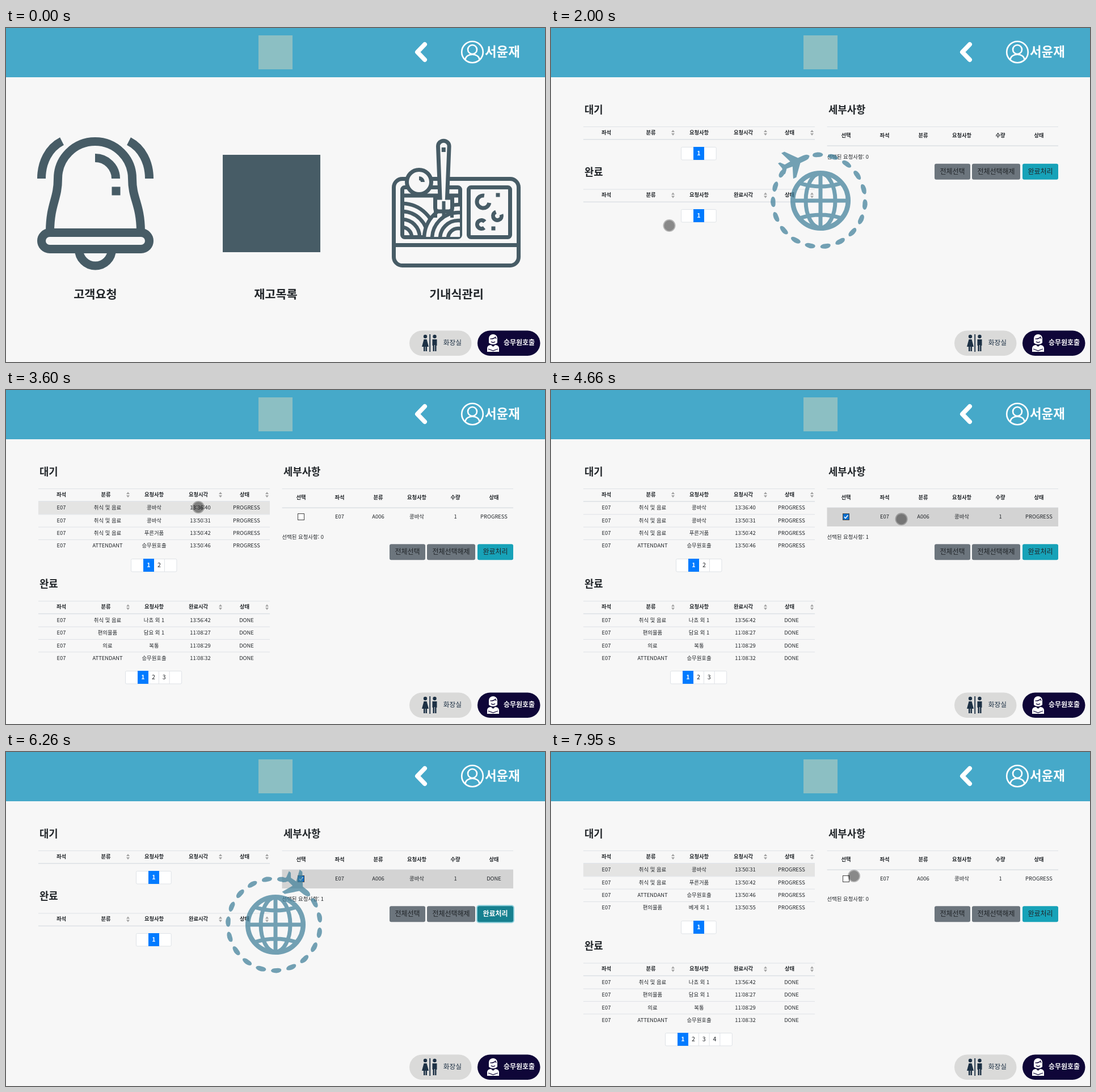
An HTML page that plays this animation: 950x590 px, repeating every 8000 ms.

```html
<!DOCTYPE html>
<html lang="ko">
<head>
<meta charset="utf-8">
<title>기내 서비스</title>
<style>
html, body { margin: 0; width: 100%; height: 100%; overflow: hidden; background: #f7f7f7; }
svg { display: block; width: 950px; height: 590px; font-family: "Noto Sans CJK KR", "Noto Sans KR", "Noto Sans", sans-serif; }
</style>
</head>
<body>
<svg id="stage" viewBox="0 0 950 590" xmlns="http://www.w3.org/2000/svg">
  <rect width="950" height="590" fill="#f7f7f7"/>
  <g id="top"></g>
  <g id="page"></g>
  <g id="pills"></g>
  <g id="loader" opacity=".72" fill="#3f7f9a" stroke="none">
    <g id="globe"></g>
    <g id="ring"></g>
  </g>
  <g id="cursor">
    <circle r="11" fill="#000" fill-opacity=".27"/>
    <circle r="9.2" fill="#000" fill-opacity=".24"/>
  </g>
</svg>
<script>
const LOOP = 8000;
const INK = '#212529', LINE = '#dee2e6', SLATE = '#475c66', BG = '#f7f7f7';
const $ = id => document.getElementById(id);

// ---- drawing helpers ----
const rect = (x, y, w, h, fill, more = '') =>
  `<rect x="${x}" y="${y}" width="${w}" height="${h}" fill="${fill}" ${more}/>`;
const path = (d, more = '') => `<path d="${d}" ${more}/>`;
const circle = (x, y, r, more = '') => `<circle cx="${x}" cy="${y}" r="${r}" ${more}/>`;
// y is the vertical middle of the letters
function text(str, x, y, size, { weight = 400, fill = INK, anchor = 'middle' } = {}) {
  return `<text x="${x}" y="${y + size * 0.37}" font-size="${size}" font-weight="${weight}" fill="${fill}" text-anchor="${anchor}">${str}</text>`;
}

// ---- fixed parts ----
function header() {
  return rect(0, 0, 950, 87, '#46a9c9') +
    rect(445, 13, 60, 60, '#8cbfc3') +
    path('M738 29L725 42.5L738 56', 'fill="none" stroke="#fff" stroke-width="8" stroke-linecap="round" stroke-linejoin="round"') +
    `<g fill="none" stroke="#fff" stroke-width="2.6">${circle(822, 42.5, 18.8)}${circle(822, 38, 8)}${path('M809.500 56C810.500 43.500 833.500 43.500 834.500 56')}</g>` +
    text('서윤재', 844, 42, 22.4, { weight: 700, fill: '#fff', anchor: 'start' });
}

function pills() {
  const dark = '#1d3145', grey = '#dadad9', navy = '#0f0638';
  const toilet = circle(739, 545, 3.2) +
    path('M736.500 550H741.500L745 563H742V571H736V563H733Z') +
    rect(746.3, 541, 1.8, 31, dark) +
    circle(755.5, 545, 3.2) +
    path('M751.500 550H759.500V561H758.500V571H752.500V561H751.500Z') +
    rect(738.5, 563, 1, 8, grey) + rect(755, 560, 1, 11, grey);
  const crew = path('M851 556V548A7.500 7 0 0 1 866 548V556Q863 559 858.500 559T851 556Z') +
    path('M848 572V565Q849 560 855 560L858.500 563L862 560Q868 560 869 565V572Z') +
    path('M853.500 549Q860 549.500 862.500 546L864 549M855 554Q858.500 557 862 554M850 567L858.500 570L867 567',
      `fill="none" stroke="${navy}" stroke-width="1.300"`);
  return rect(711, 534.5, 109.5, 44.5, grey, 'rx="22.2"') +
    `<g fill="${dark}">${toilet}</g>` +
    text('화장실', 787, 556, 11.7, { weight: 500, fill: dark }) +
    rect(831, 534.5, 110.5, 44.5, navy, 'rx="22.2"') +
    `<g fill="#fff">${crew}</g>` +
    text('승무원호출', 904.5, 556, 12, { weight: 700, fill: '#fff' });
}

// ---- menu page ----
function bell() {
  const wave = path('M62.500 266C62.500 238 75 212 98.500 200');
  return `<g fill="none" stroke="${SLATE}" stroke-width="15">` +
    path('M77.500 359C78 310 91.500 303 91.500 266A65.500 65.500 0 0 1 222.500 266C222.500 303 237 310 237.500 359') +
    rect(62.5, 361.5, 190, 29, 'none', 'rx="14.5"') +
    path('M128.500 391A29 29 0 0 0 186.500 391') +
    wave + `<g transform="matrix(-1 0 0 1 315 0)">${wave}</g>` +
    path('M157 229.500A36.500 36.500 0 0 1 193.500 266') +
    `</g>` + rect(186.5, 280.5, 15, 15, SLATE);
}

const arcs = (cx, cy, radii) => radii.map(r => circle(cx, cy, r)).join('');

function meal() {
  const cShape = (x, y, r, turn) =>
    path(`M${r} 0A${r} ${r} 0 1 1 0 ${-r}`, `transform="translate(${x} ${y}) rotate(${turn})"`);
  return `<clipPath id="tray"><rect x="699" y="293" width="101" height="76"/></clipPath>` +
    `<g fill="none" stroke="${SLATE}" stroke-width="7">` +
    rect(683.5, 266.5, 220, 153, 'none', 'rx="15"') + path('M683 383.500H904') +
    rect(698.5, 281.5, 102, 88, 'none', 'rx="4"') + rect(815.5, 281.5, 73, 88, 'none', 'rx="4"') +
    path('M699 296H800') +
    `<g clip-path="url(#tray)" stroke-width="6.500">${arcs(698, 369, [17, 31, 45, 59])}` +
    `<g fill="${BG}">${arcs(797, 372, [60, 46, 32, 18])}</g></g>` +
    circle(728, 272, 21.5, `fill="${BG}"`) +
    path('M728 265.500A6.500 6.500 0 0 1 734.500 272') +
    path('M761.500 209A9.800 9.800 0 0 1 781.100 209L777.500 300H786.500V318Q786.500 324 780 324H763Q756.500 324 756.500 318V300H765Z', `fill="${BG}"`) +
    path('M757 306V335M771.500 306V335M786 306V335', 'stroke-width="6"') +
    cShape(841, 307, 11, 10) + cShape(866, 332, 7.5, -20) + cShape(838, 347, 7.5, 50) +
    `</g>` + rect(863.5, 291.5, 7, 7, SLATE) + rect(855.5, 350.5, 7, 7, SLATE) + rect(767.8, 211, 7, 8, SLATE);
}

function menu() {
  const label = (s, x) => text(s, x, 470, 20.8, { weight: 700 });
  return bell() + rect(382, 224, 172, 172, SLATE) + meal() +
    label('고객요청', 157.5) + label('재고목록', 475.5) + label('기내식관리', 794);
}

// ---- request page ----
const SNACK = '콩바삭', FOOD = '취식 및 음료';
const waiting = [
  [FOOD, SNACK, '13:36:40'], [FOOD, SNACK, '13:50:31'], [FOOD, '푸른거품', '13:50:42'],
  ['ATTENDANT', '승무원호출', '13:50:46'], ['편의물품', '베게 외 1', '13:50:55']
];
const finished = [
  [FOOD, '나쵸 외 1', '13:56:42'], ['편의물품', '담요 외 1', '11:08:27'],
  ['의료', '복통', '11:08:29'], ['ATTENDANT', '승무원호출', '11:08:32']
];
const COLS = [97.5, 179, 261, 342.5, 424];
const ROW = 22.3;

const hline = (x, y, w, h = 1) => rect(x, y, w, h, LINE);
const title = (s, x, y) => text(s, x, y, 17.8, { weight: 700, anchor: 'start' });
const sorter = (x, y) =>
  path(`M${x - 3} ${y - 1}h6l-3 -4zM${x - 3} ${y + 1}h6l-3 4z`, 'fill="#a3a3a3"');

function pager(count, top) {
  const w = 18.7, y = Math.round(top), x0 = Math.round(260.5 - (44 + w * count) / 2);
  let s = rect(x0 + 0.5, y + 0.5, 43 + w * count, 22.5, '#fff', `rx="2" stroke="${LINE}"`);
  for (let i = 0; i < count; i++) {
    const x = x0 + 22 + i * w;
    s += i ? rect(x + w - 0.5, y, 1, 23, LINE) : rect(x, y, 19, 23, '#007bff');
    s += text(i + 1, x + w / 2, y + 11.5, 10.6, { weight: i ? 400 : 700, fill: i ? INK : '#fff' });
  }
  return s;
}

// y is the top line
function table(name, timeLabel, rows, status, pages, y, active) {
  let s = title(name, 59, y - 30) + hline(57, y, 408) + hline(57, y + 22, 408, 1.6);
  const heads = ['좌석', '분류', '요청사항', timeLabel, '상태'];
  const shift = [0, -3, 0, -3.5, -3.5];
  heads.forEach((h, i) => s += text(h, COLS[i] + shift[i], y + 10.5, 9.3, { weight: 700 }));
  s += [215, 378, 460].map(x => sorter(x, y + 11)).join('');
  if (active) s += rect(57, y + 23.5, 408, 21.8, '#e4e4e3');
  rows.forEach((r, i) => {
    const cy = y + 34 + i * ROW;
    if (i) s += hline(57, y + 23 + i * ROW, 408);
    ['E07', ...r, status].forEach((c, k) => s += text(c, COLS[k], cy, 9.4));
  });
  return s + pager(pages, y + 35.5 + rows.length * 22.1);
}

function button(label, x, y, w, fill, focus) {
  const halo = focus ? rect(x - 2, y - 2, w + 4, 32, '#8fd0dc', 'rx="5"') : '';
  return halo + rect(x, y, w, 28, fill, 'rx="3"') +
    text(label, x + w / 2, y + 13.5, 12, { weight: focus ? 700 : 400, fill: focus ? '#fff' : INK });
}

function detail(s) {
  const xs = [520, 588, 656, 724, 792, 860];
  let m = title('세부사항', 489, 144.5) + hline(486.5, 174, 407.5) + hline(486.5, 207.3, 407.5, 1.6);
  ['선택', '좌석', '분류', '요청사항', '수량', '상태'].forEach((h, i) =>
    m += text(h, xs[i], 190, 9.3, { weight: 700 }));
  let dy = 0;
  if (s.item) {
    dy = 32.5;
    if (s.checked) m += rect(486.5, 208, 407.5, 33, '#d3d3d3');
    m += rect(514.5, 218.5, 11, 11, s.checked ? '#0b6fd0' : '#fff', 'stroke="#444"');
    if (s.checked) m += path('M516.800 224L519 226.500L523.300 221.300', 'fill="none" stroke="#fff" stroke-width="1.500"');
    ['E07', 'A006', SNACK, '1', s.item].forEach((c, i) => m += text(c, xs[i + 1], 224, 9.4));
  }
  const y = 239.8 + dy;
  return m + text('선택된 요청사항: ' + (s.checked ? 1 : 0), 486.5, 227.5 + dy, 9.4, { anchor: 'start' }) +
    button('전체선택', 676, y, 63, '#6c757d') +
    button('전체선택해제', 742, y, 85, '#6c757d') +
    button('완료처리', 831, y, 63, s.focus ? '#16808f' : '#17a2b8', s.focus);
}

function requests(s) {
  const wait = s.loading ? [] : waiting.slice(s.served, s.served + 4);
  const done = s.loading ? [] : finished;
  return table('대기', '요청시각', wait, 'PROGRESS', s.loading || s.served ? 1 : 2, 174, s.active) +
    table('완료', '완료시각', done, 'DONE', s.loading ? 1 : 3 + s.served, s.loading ? 284.5 : 372.5) +
    detail(s);
}

// ---- loader ----
function globe() {
  return `<g transform="translate(475 305)" fill="none" stroke="#3f7f9a" stroke-width="7">` +
    circle(0, 0, 48.8, 'stroke-width="8.5"') +
    `<ellipse rx="26" ry="48"/>` +
    path('M0 -48V48M-48 0H48M-37 -31Q0 -19 37 -31M-37 31Q0 19 37 31') + `</g>`;
}
function ring() {
  let s = path('M29 0Q27 -5 19 -5L9 -5L-8 -25H-14L-6 -5L-17 -4L-23 -11H-27L-24 0L-27 11H-23L-17 4L-6 5L-14 25H-8L9 5L19 5Q27 5 29 0Z',
    'transform="translate(0 -80) rotate(8)"');
  for (let k = 0; k < 17; k++)
    s += path('M-9 1Q-9 -4 0 -4.500Q9 -4 9.500 0Q8 4.500 0 4Q-8 4.500 -9 1Z',
      `transform="rotate(${31 + 19.3 * k}) translate(0 -81)"`);
  return s;
}

// ---- time ----
const SPIN = 1958;
const within = (t, a, b) => t >= a && t < b;

function stateAt(t) {
  return {
    home: t < 1650,
    loading: within(t, 1650, 2400) || within(t, 5520, 6300),
    served: t >= 6300 ? 1 : 0,
    active: within(t, 3400, 4330) || t >= 7210,
    item: within(t, 3540, 5450) || t >= 7350 ? 'PROGRESS' : within(t, 5450, 6300) ? 'DONE' : '',
    checked: within(t, 4330, 6300),
    focus: within(t, 5320, 7210)
  };
}

const moves = [
  [140, 735, 574], [920, 300, 405], [1010, 301, 406], [1250, 166, 307], [1650, 166, 307],
  [2000, 208, 349], [2440, 427, 355], [2840, 427, 355], [3200, 339, 207], [3620, 339, 207],
  [4190, 522, 223], [4330, 522, 223], [4660, 617, 228], [5060, 855, 264], [5240, 862, 284],
  [6300, 700, 240], [6740, 340, 200], [6810, 340, 199], [6880, 339, 207], [7340, 339, 207],
  [7950, 534, 219], [LOOP, 534, 219]
];
function cursorAt(t) {
  if (t < 140 || within(t, 5480, 6300)) return null;
  const i = moves.findIndex(m => m[0] > t);
  const [t0, x0, y0] = moves[i - 1], [t1, x1, y1] = moves[i];
  const p = (t - t0) / (t1 - t0);
  return [x0 + (x1 - x0) * p, y0 + (y1 - y0) * p];
}

let lastKey = '';
function render(t) {
  const s = stateAt(t), key = JSON.stringify(s);
  if (key !== lastKey) {
    lastKey = key;
    $('page').innerHTML = s.home ? menu() : requests(s);
    $('loader').style.display = s.loading ? '' : 'none';
  }
  const turn = -33 + (t - 2000) / SPIN * 360;
  $('ring').setAttribute('transform', `translate(472.5 305) rotate(${turn})`);
  const c = cursorAt(t);
  $('cursor').style.display = c ? '' : 'none';
  if (c) $('cursor').setAttribute('transform', `translate(${c[0]} ${c[1]})`);
}

$('top').innerHTML = header();
$('pills').innerHTML = pills();
$('globe').innerHTML = globe();
$('ring').innerHTML = ring();

const start = performance.now();
function tick() {
  render((performance.now() - start) % LOOP);
  requestAnimationFrame(tick);
}
tick();
</script>
</body>
</html>
```
